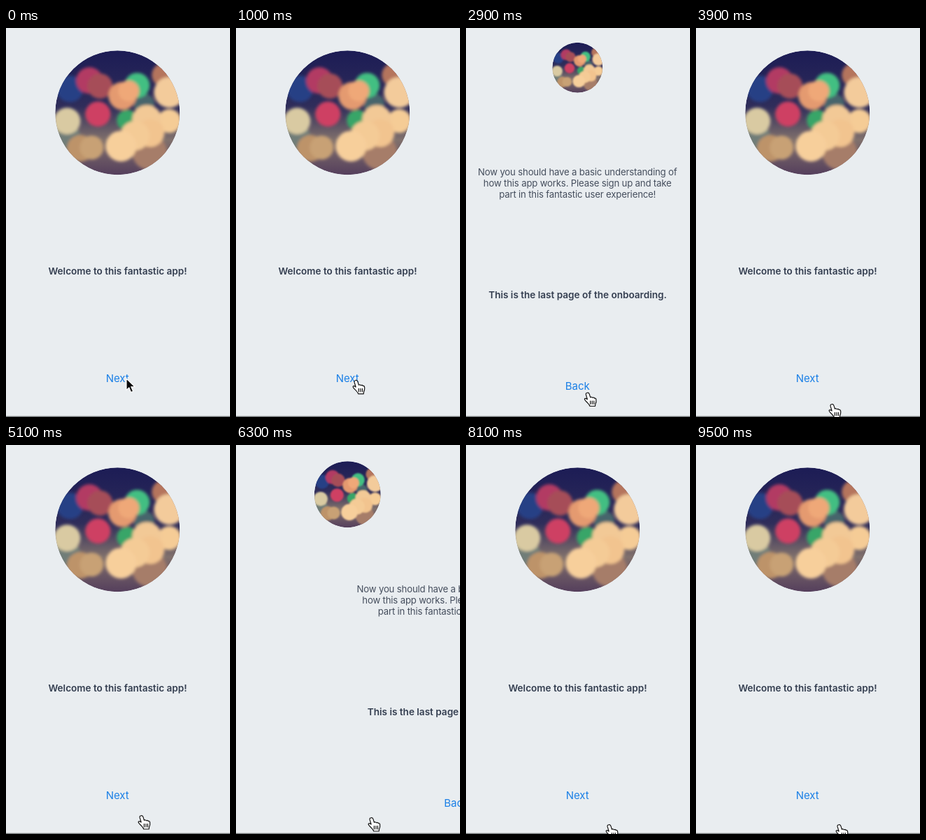
An HTML page that plays this animation: 320 by 557 pixels, repeating every 9.6 s.

```html
<!DOCTYPE html>
<html lang="en">
<head>
<meta charset="utf-8">
<title>Onboarding</title>
<style>
  html, body { margin: 0; width: 100%; height: 100%; overflow: hidden; background: #e9edf0; }
  svg { display: block; width: 320px; height: 557px; }
  text { font-family: Inter, "Liberation Sans", sans-serif; text-anchor: middle; }
  .body { font-size: 13.2px; letter-spacing: -.18px; fill: #454e5d; }
  .bold { font-size: 13.55px; font-weight: 600; fill: #343e50; }
  .link { font-size: 15px; fill: #1a7fe6; }
</style>
</head>
<body>
<svg viewBox="0 0 320 557">
  <defs>
    <linearGradient id="night" x1="0" y1="0" x2="0" y2="1">
      <stop offset="0" stop-color="#1c1c55"/>
      <stop offset=".45" stop-color="#2f2d5a"/>
      <stop offset=".72" stop-color="#80706c"/>
      <stop offset="1" stop-color="#553f5c"/>
    </linearGradient>
    <clipPath id="round"><circle r="89"/></clipPath>
    <filter id="soft" x="-20%" y="-20%" width="140%" height="140%"><feGaussianBlur stdDeviation="2"/></filter>
  </defs>
  <rect width="320" height="557" fill="#e9edf0"/>

  <g id="photo">
    <g clip-path="url(#round)">
      <circle r="89" fill="url(#night)"/>
      <g id="lights" filter="url(#soft)"></g>
    </g>
  </g>

  <g id="first">
    <text class="bold" x="159.5" y="353">Welcome to this fantastic app!</text>
    <text class="link" x="159.2" y="507.3">Next</text>
  </g>
  <g id="last">
    <text class="body" x="159.2" y="211">Now you should have a basic understanding of</text>
    <text class="body" x="159.2" y="227">how this app works. Please sign up and take</text>
    <text class="body" x="159.2" y="243">part in this fantastic user experience!</text>
    <text class="bold" x="159.5" y="387">This is the last page of the onboarding.</text>
    <text class="link" x="159.2" y="518.3">Back</text>
  </g>

  <rect y="555.7" width="320" height="1.3" fill="#707376"/>

  <path id="arrow" d="M0 0V16.5L3.8 12.9L6.6 19.6L9.6 18.3L6.8 11.8H12Z"
        fill="#080808" stroke="#fff" stroke-width="1.1"/>
  <g id="hand" stroke="#111" stroke-width="1.2" stroke-linejoin="round" stroke-linecap="round">
    <path fill="#fff" d="M-1 .7C.6 .3 1.6 1.3 2 2.8L3.4 7.4C4.4 6.6 6 6.9 6.5 7.9C7.6 7.1 8.9 7.6 9.3 8.7
      C10.7 8.2 11.5 9.2 11.6 10.5C12 13 11.6 15 10.6 17L10.2 20H2.7C2.2 18 .2 16-1.8 14
      C-3.3 12.5-5.3 11-4.8 9.5C-4.3 8.3-2.4 8.7-.9 10.2L-2.9 3.4C-3.2 2-2.5 1-1 .7Z"/>
    <path fill="none" d="M3.4 12.5V17M6 12.5V17M8.5 12.5V17"/>
  </g>
</svg>
<script>
const LOOP = 9600, STEP = 100, TURN = 400, TRAVEL = 720;
const $ = id => document.getElementById(id);
const [photo, first, last, arrow, hand] = ['photo', 'first', 'last', 'arrow', 'hand'].map($);

// blurred lights around the centre: x, y, radius, colour
const lights = [
  [-68, -34, 19, '#263f85'], [-76, 38, 24, '#6f7d78'], [66, -54, 17, '#b5745d'],
  [46, 57, 25, '#a67d69'], [38, -12, 15, '#47656c'], [-40, -46, 19, '#b23a64'],
  [-25, -38, 18, '#a64e59'], [28, -39, 18, '#43bf82'], [14, 11, 15, '#38a568'],
  [7, -24, 20, '#e49a70'], [16, -31, 15, '#efa878'], [-28, 2, 18, '#ce4064'],
  [-72, 12, 19, '#d9caa2'], [-53, 51, 19, '#bd9369'], [-37, 50, 17, '#c8a174'],
  [74, -29, 22, '#f3cb9b'], [74, 12, 17, '#f5cc96'], [42, 10, 21, '#f2c996'],
  [47, 29, 20, '#f2c48f'], [25, 33, 21, '#f4cb96'], [5, 48, 22, '#f7cf9b']
];
for (const [cx, cy, r, fill] of lights) {
  const dot = document.createElementNS('http://www.w3.org/2000/svg', 'circle');
  Object.entries({ cx, cy, r, fill }).forEach(([k, v]) => dot.setAttribute(k, v));
  $('lights').append(dot);
}

// page turns: start time, direction
const turns = [[1706, 1], [3450, -1], [6020, 1], [7550, -1]];

// fingertip: time, x, y
const track = [
  [0, 172, 503], [1350, 172, 504], [1800, 198, 523], [2100, 196, 524], [2700, 174, 521],
  [3300, 175, 523], [3900, 195, 538], [4700, 195, 538], [5100, 194, 530], [5600, 195, 537],
  [6300, 194, 533], [6800, 187, 532], [7450, 187, 533], [7900, 205, 543], [9600, 205, 543]
];

const mix = (a, b, k) => a + (b - a) * k;
const smooth = x => { x = Math.min(1, Math.max(0, x)); return x * x * (3 - 2 * x); };
const progress = t =>
  turns.reduce((sum, [start, dir]) => sum + dir * smooth((t - start) / TURN), 0);
const place = (el, x, y, s = 1) => el.setAttribute('transform', `translate(${x} ${y}) scale(${s})`);

function fingertip(t) {
  const i = track.findIndex(p => p[0] > t);
  const [t0, x0, y0] = track[i - 1], [t1, x1, y1] = track[i];
  const k = smooth((t - t0) / (t1 - t0));
  return [mix(x0, x1, k), mix(y0, y1, k)];
}

function draw(t) {
  const page = progress(t);
  place(first, -TRAVEL * page, 0);
  place(last, TRAVEL * (1 - page), 0);
  place(photo, 159.3, mix(121.2, 56.8, page), mix(89, 36, page) / 89);
  place(arrow, 172, 502);
  place(hand, ...fingertip(t));
  const early = t < 300;
  arrow.style.display = early ? '' : 'none';
  hand.style.display = early ? 'none' : '';
}

function tick() {
  draw(Math.floor(performance.now() % LOOP / STEP) * STEP);
  requestAnimationFrame(tick);
}
tick();
</script>
</body>
</html>
```
